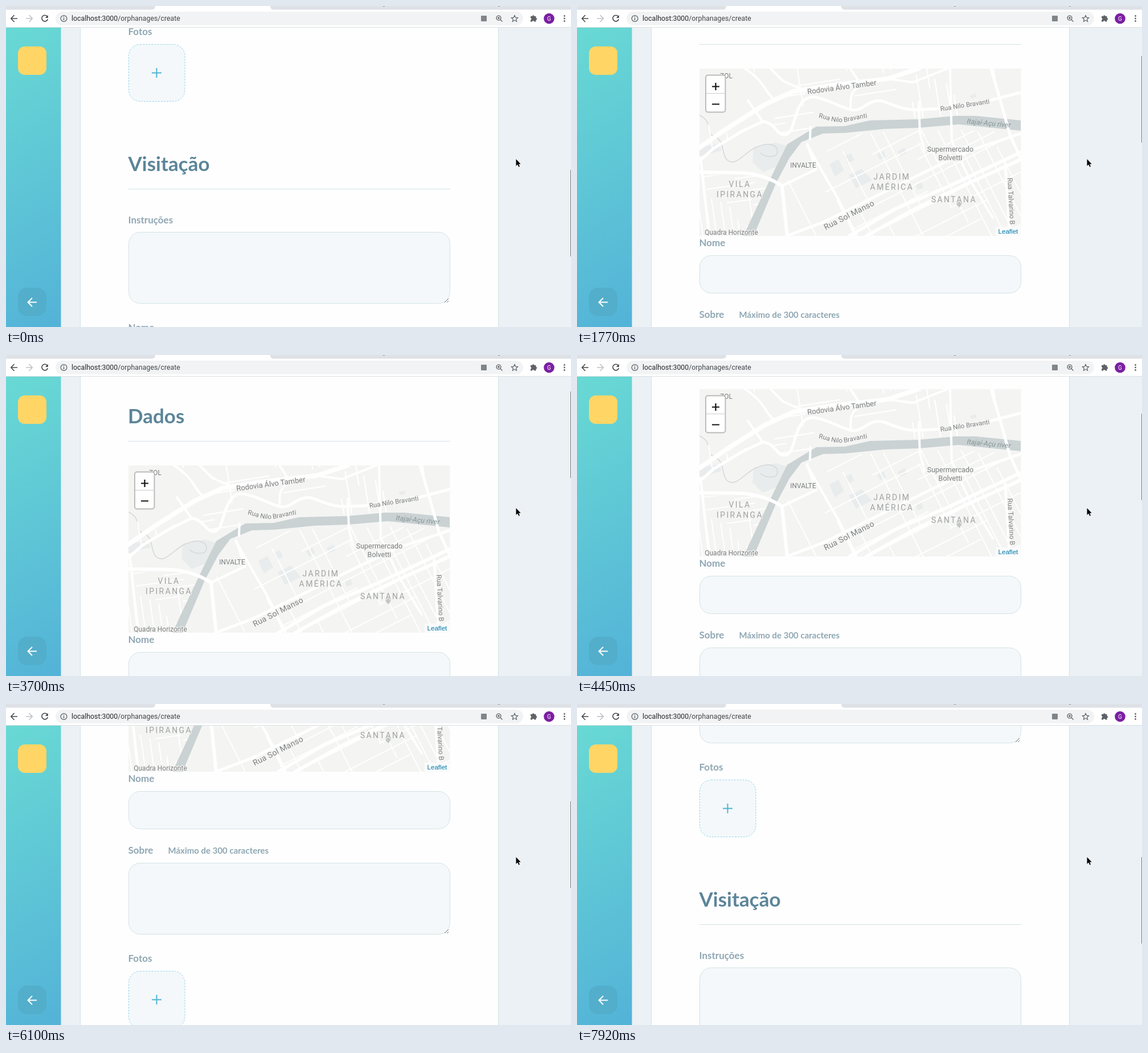
Animation, 992 px wide and 564 px high, one loop 8 s. Source, as an HTML page:

```html
<!DOCTYPE html>
<html lang="pt-BR">
<head>
<meta charset="utf-8">
<title>Cadastro</title>
<style>
  html, body { margin: 0; width: 100%; height: 100%; overflow: hidden; background: #ebf1f5; }
  svg { display: block; width: 100vw; height: 100vh; }
  .title { font: 700 35px Lato, sans-serif; fill: #5c8599; }
  .label { font: 700 17px Lato, sans-serif; fill: #8fa7b3; }
  .hint { font-size: 15px; }
  .field { fill: #f4f8fa; stroke: #d3e2e5; }
  .rule { stroke: #d3e2e5; }
  .grip { stroke: #6f7577; fill: none; }
  .road { fill: none; stroke: #fff; stroke-linejoin: round; stroke-linecap: round; }
  .map text { font: 12px Roboto, sans-serif; fill: #7d8080; text-anchor: middle;
    paint-order: stroke; stroke: #f5f5f4; stroke-width: 2.5px; stroke-linejoin: round; }
  .map .area { font-size: 14px; letter-spacing: 2.4px; fill: #a0a3a3; }
  .map .place { font-size: 12.5px; }
  .map .lane { font-size: 11.5px; }
  .map .avenue { font-size: 13px; }
  .map .start { text-anchor: start; }
  .map .water { font-size: 12.5px; font-style: italic; fill: #869496; stroke: none; }
  .map .credit { font: 11.6px "Liberation Sans", sans-serif; fill: #0078a8; stroke: none; text-anchor: start; }
  .icon { fill: none; stroke: #5f6368; stroke-width: 1.6; }
  .url { font: 12.35px Roboto, sans-serif; fill: #45484c; }
  .url tspan { fill: #26282b; }
  .user { font: 10px Roboto, sans-serif; fill: #fff; text-anchor: middle; }
</style>
</head>
<body>
<svg viewBox="0 0 992 564" preserveAspectRatio="none">
  <defs>
    <linearGradient id="sea" gradientUnits="userSpaceOnUse" x1="194" y1="514" x2="-56" y2="88">
      <stop offset="0" stop-color="#53b2d8"/><stop offset="1" stop-color="#68d8d4"/>
    </linearGradient>
    <clipPath id="view"><path d="M0 38H992V564H0Z"/></clipPath>
    <clipPath id="mapBox"><path d="M215 228H779.5V522H215Z"/></clipPath>
    <clipPath id="south"><path d="M362 440L402 358L440 346L640 333L779 342V522H368Z"/></clipPath>
    <clipPath id="west"><path d="M215 416L300 414L340 424L294 522H215Z"/></clipPath>
    <clipPath id="north"><path d="M215 228H779V318L675 310L515 318L420 330L372 352L330 320L215 380Z"/></clipPath>
    <path id="bend" d="M424 314C436 316 446 322 462 322S490 316 513 314"/>
    <path id="grip" class="grip" d="M770 -1.5L777 -8.5M774 -1.5L777 -4.5"/>
  </defs>

  <rect width="992" height="564" fill="#ebf1f5"/>

  <g clip-path="url(#view)">
    <g id="page">
      <rect x="130.5" y="56.5" width="734" height="1700" rx="20" fill="#fefefe" stroke="#d3e2e5"/>
      <text class="title" x="214" y="153.5">Dados</text>
      <path class="rule" d="M215 185.5H779.5"/>

      <g class="map" clip-path="url(#mapBox)">
        <rect x="215" y="228" width="565" height="294" fill="#f4f4f3"/>
        <g fill="#e9ecec">
          <path d="M443 396L459 387L469 407L453 418Z"/>
          <path d="M477 415L500 404L518 424L490 438Z"/>
          <path d="M310 366L350 358L368 364L352 400L326 410L308 392Z"/>
          <path d="M215 366L250 360L254 372L215 382Z"/>
          <path d="M527 379L538 373L543 383L532 388ZM563 373L575 367L579 377L567 382ZM595 432L605 427L608 437L598 441ZM469 382L481 377L487 389L475 394ZM690 275L700 272L701 278L691 280Z"/>
        </g>
        <path d="M215 310C232 318 230 328 235 344C262 352 252 376 263 388C280 402 292 376 315 366S352 362 352 374S330 384 322 376" fill="none" stroke="#d3d8d8" stroke-width="1.5"/>
        <path id="southStreets" class="road" stroke-width="2" clip-path="url(#south)"/>
        <path id="westStreets" class="road" stroke-width="2" clip-path="url(#west)"/>
        <path id="northStreets" class="road" stroke-width="2.2" clip-path="url(#north)"/>

        <path d="M292 522L343 414L369 361L420 330L470 329L515 319L600 317L665 311L700 311L779 319V337L720 331L670 326L600 332L540 334L470 341L432 342L394 357L373 385L349 430L310 522Z" fill="#cad2d3"/>

        <g class="road" stroke-width="5">
          <path d="M215 367L262 334L330 291L380 268L450 257L545 246L600 228" stroke-width="8"/>
          <path d="M215 390L240 368L290 338L326 321C350 324 350 346 366 344S380 302 398 284S455 294 480 300S512 274 545 288S585 302 640 298L725 284L779 270"/>
          <path d="M480 228L500 258C474 268 482 290 480 300M545 246L590 252L650 228M326 321L300 284M295 228C330 250 330 270 346 282M340 228L362 250L394 264" stroke-width="4"/>
          <path d="M215 410L290 411Q330 414 360 434L369 522" stroke-width="6"/>
          <path d="M217 385L222 430L232 522M360 434L420 405L404 360M404 362L440 425L458 456L490 520" stroke-width="4.5"/>
          <path d="M410 330L409 352M600 286L602 340L610 372M655 228L658 355L690 424L730 490" stroke-width="4"/>
          <path d="M368 522L432 498L525 452L620 405L690 372L779 342"/>
          <path d="M478 522L560 474L650 436L779 375" stroke-width="6"/>
          <path d="M508 522L590 476L690 428L779 388" stroke-width="6"/>
          <path d="M727 228L745 290L760 344L779 386M752 395L760 522"/>
        </g>
        <path d="M666 463L671 458L677 463L674 468L672 472L667 468Z" fill="#c3c6c6"/>

        <text x="262" y="245">ZOL</text>
        <text class="avenue" x="465" y="265" transform="rotate(-7.5 465 261)">Rodovia Álvo Tamber</text>
        <text class="lane start"><textPath href="#bend">Rua Nilo Bravanti</textPath></text>
        <text class="lane" x="681" y="296" transform="rotate(-9 681 292)">Rua Nilo Bravanti</text>
        <text class="water" x="723" y="328" transform="rotate(5.5 723 324)">Itajaí-Açu river</text>
        <text x="397" y="402">INVALTE</text>
        <text class="place" x="655.5" y="374">Supermercado</text>
        <text class="place" x="655.5" y="389">Bolvetti</text>
        <text class="area" x="286" y="436">VILA</text>
        <text class="area" x="286" y="454">IPIRANGA</text>
        <text class="area" x="553" y="423">JARDIM</text>
        <text class="area" x="553" y="441">AMÉRICA</text>
        <text class="area" x="662" y="463">SANTANA</text>
        <text class="area" x="478" y="490" style="letter-spacing:.3px;fill:#7d8080" transform="rotate(-27 478 486)">Rua Sol Manso</text>
        <text class="start" transform="translate(756 420) rotate(87)">Rua Talvarino B</text>
        <text x="271" y="520">Quadra Horizonte</text>

        <path d="M735 506H780V522H735Z" fill="#fbfbfb"/>
        <text class="credit" x="739.5" y="518">Leaflet</text>
        <rect x="226" y="239.5" width="34.5" height="65" rx="4" fill="#fff" stroke="#bcbcbc" stroke-width="2"/>
        <path d="M227 271.5H259.5" stroke="#ccc"/>
        <path d="M237 259.5H250M243.5 253V266M237 290.5H250" stroke="#111" stroke-width="2.2"/>
      </g>

      <text class="label" x="214.5" y="540">Nome</text>
      <rect class="field" x="215.5" y="556.5" width="564" height="66" rx="20"/>
      <text class="label" x="214.5" y="666">Sobre</text>
      <text class="label hint" x="284.5" y="666">Máximo de 300 caracteres</text>
      <rect class="field" x="215.5" y="682.5" width="564" height="125" rx="20"/>
      <use href="#grip" y="807.5"/>

      <text class="label" x="214.5" y="856">Fotos</text>
      <rect x="215.5" y="872.5" width="98.5" height="100" rx="20" fill="#f4f8fa" stroke="#96d2f0" stroke-dasharray="3 2"/>
      <path d="M256 922.5H273M264.5 914V931" stroke="#4fb4d4" stroke-width="2"/>

      <text class="title" x="214.5" y="1095">Visitação</text>
      <path class="rule" d="M215 1126.5H779.5"/>
      <text class="label" x="214.5" y="1186.5">Instruções</text>
      <rect class="field" x="215.5" y="1202.5" width="564" height="125" rx="20"/>
      <use href="#grip" y="1327.5"/>
      <text class="label" x="214.5" y="1376">Nome</text>
    </g>
    <rect id="thumb" x="991" y="54" width="3" height="152" fill="#767b7d"/>
  </g>

  <path d="M0 38H96.5V564H0Z" fill="url(#sea)"/>
  <rect x="21" y="71" width="50" height="50" rx="12" fill="#ffd666"/>
  <rect x="21" y="495" width="50" height="50" rx="16" fill="#52aecb"/>
  <path d="M54 520.5H39M46 513L38.5 520.5L46 528" fill="none" stroke="#fff" stroke-width="2"/>

  <path d="M0 0H992V38H0Z" fill="#fff"/>
  <path d="M0 0H262Q262 6.5 256 6.5H0ZM464 0H992V6.5H470Q464 6.5 464 0Z" fill="#dee1e6"/>
  <path d="M662 0H665V1H662ZM864 0H867V1H864Z" fill="#8d9196"/>
  <path d="M0 37.5H992" stroke="#dcdfe2"/>
  <rect x="87" y="10" width="821" height="24" rx="12" fill="#f1f3f4"/>
  <g class="icon">
    <path d="M20 22H9M14.5 16L8.8 22L14.5 28" stroke="#46494d"/>
    <path d="M35 22H46M40.5 16L46.2 22L40.5 28" stroke="#bdc1c6"/>
    <path d="M72.5 18.5A5.3 5.3 0 1 0 73.3 23" stroke="#46494d"/>
    <path d="M73.8 16V21H68.8Z" fill="#46494d" stroke="none"/>
    <circle cx="101.5" cy="22" r="5.4" stroke-width="1.3"/>
    <path d="M101.5 21V25M101.5 18.5V20" stroke-width="1.4"/>
    <circle cx="865" cy="21" r="3.9" stroke-width="1.4"/>
    <path d="M868 24L871.5 27.5M863 21H867M865 19V23" stroke-width="1.3"/>
    <path d="M893 16.5L894.6 20.2L898.6 20.6L895.6 23.2L896.5 27.2L893 25.1L889.5 27.2L890.4 23.2L887.4 20.6L891.4 20.2Z" stroke-width="1.2"/>
  </g>
  <rect x="834" y="17" width="10" height="10" rx="1" fill="#80858a"/>
  <path d="M921 18H924A1.8 1.8 0 0 1 927.6 18H930.5V21A1.8 1.8 0 0 1 930.5 24.6V27.5H927.5A1.8 1.8 0 0 0 924 27.5H921V24.5A1.8 1.8 0 0 0 921 21Z" fill="#5f6368"/>
  <circle cx="953.5" cy="22" r="9.3" fill="#7b1fa2"/>
  <text class="user" x="953.5" y="25.7">G</text>
  <path d="M980.5 17.5h0M980.5 22h0M980.5 26.5h0" stroke="#5f6368" stroke-width="2.8" stroke-linecap="round"/>
  <text class="url" x="115" y="26"><tspan>localhost:3000</tspan>/orphanages/create</text>

  <path d="M895.5 269V281L898.3 278.4L900.2 282.8L902 282L900.1 277.7H903.7Z" stroke="#fff" paint-order="stroke"/>
</svg>
<script>
  const $ = id => document.getElementById(id);

  let seed = 7;
  const rand = () => (seed = seed * 16807 % 2147483647) / 2147483647;

  // Broken parallel streets in two crossing directions around a centre.
  function streets(id, cx, cy, angle, count, gap, reach, length) {
    let d = "";
    for (const turn of [0, 90]) {
      const a = (angle + turn) * Math.PI / 180, c = Math.cos(a), s = Math.sin(a);
      for (let i = 0; i < count; i++) {
        const across = (i - count / 2 + rand() * 0.4) * gap;
        const from = (rand() - 0.6) * 2 * reach, to = from + length * (0.5 + rand());
        const at = along => `${(cx + c * along - s * across).toFixed(1)} ${(cy + s * along + c * across).toFixed(1)}`;
        d += `M${at(from)}L${at(to)}`;
      }
    }
    $(id).setAttribute("d", d);
  }
  streets("southStreets", 590, 430, -27, 20, 21, 150, 190);
  streets("westStreets", 275, 465, -8, 11, 13, 55, 80);
  streets("northStreets", 500, 270, -9, 38, 15, 150, 75);

  // Pairs of start time in ms and scroll offset in px.
  const steps = [
    [0, 805], [140, 772], [290, 705], [440, 638], [590, 571], [740, 503], [890, 436], [1030, 369],
    [1180, 310], [1330, 260], [1480, 209], [1620, 163], [1770, 118], [1920, 76], [2060, 36], [2210, 0],
    [3700, 34], [4150, 67], [4300, 134], [4450, 168], [4600, 201], [4750, 235], [5050, 268], [5200, 302],
    [5650, 336], [5950, 369], [6100, 403], [6550, 436], [6700, 503], [6840, 571], [6990, 638], [7140, 672],
    [7440, 705], [7920, 739]
  ];

  function draw() {
    const t = performance.now() % 8000;
    const y = steps.findLast(step => step[0] <= t)[1];
    $("page").setAttribute("transform", `translate(0 ${-y})`);
    $("thumb").setAttribute("y", Math.round(54 + y * 0.291));
    requestAnimationFrame(draw);
  }
  draw();
</script>
</body>
</html>
```
